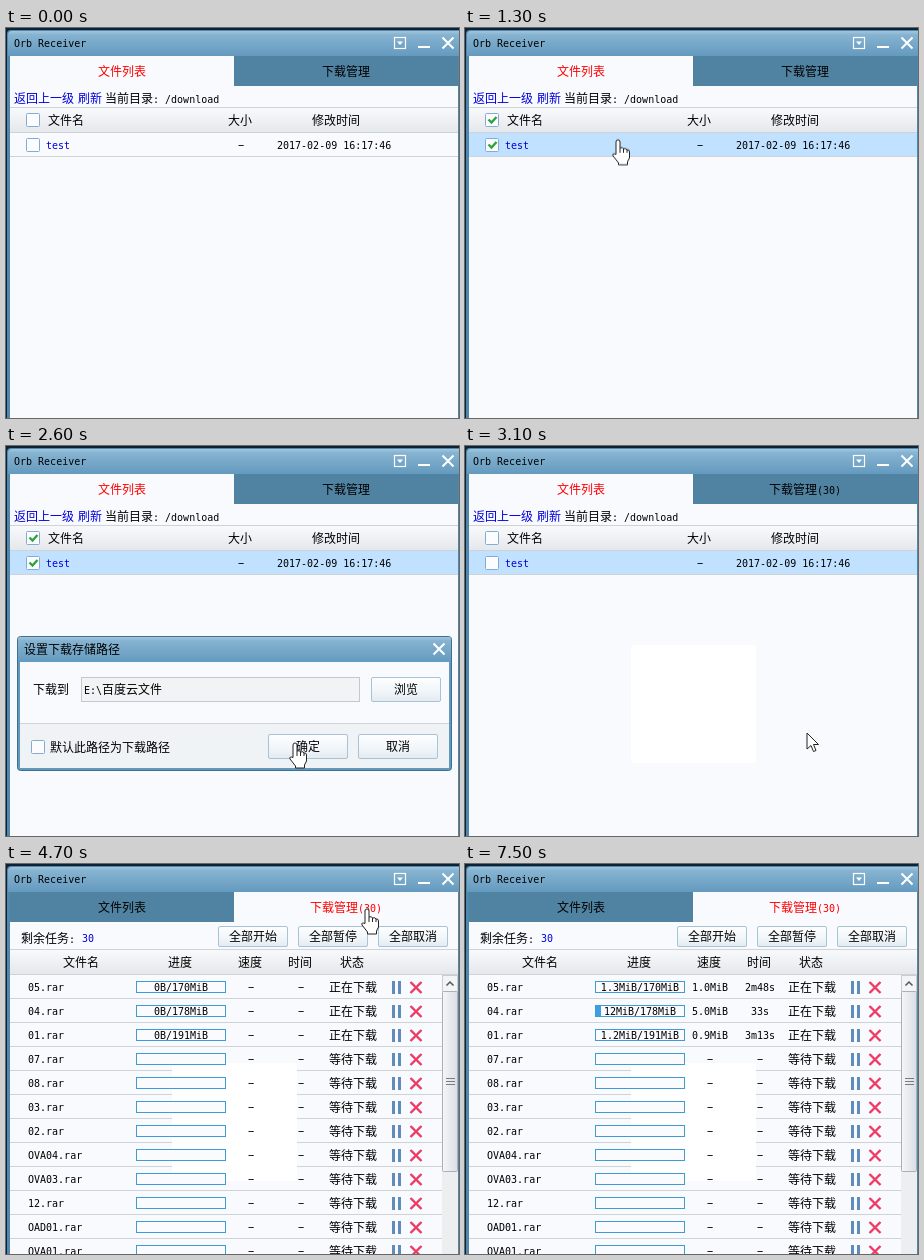
Recreate the animation shown at these times as an HTML page. Size 453 by 390 pixels, loop 8000 ms.

```html
<!DOCTYPE html>
<html lang="zh">
<head>
<meta charset="utf-8">
<title>Orb Receiver</title>
<style>
html, body { margin: 0; width: 100%; height: 100%; overflow: hidden; background: #0d2233; }
svg { display: block; }
text { font: 12px "Noto Sans Mono CJK SC", "Noto Sans CJK SC", monospace; fill: #000; white-space: pre; }
.lat { font: 10px "DejaVu Sans Mono", monospace; }
.dash { font: 12px "Liberation Mono", monospace; }
.mid { text-anchor: middle; }
.blue { fill: #00d; }
.red { fill: #f00; }
.page { fill: #f8fafd; }
.tab { fill: #5082a2; }
.line { stroke: #cfd3d8; }
.icon { fill: none; stroke: #fff; stroke-width: 2; }
.box { fill: #fafcff; stroke: #86abd0; }
.tick { fill: none; stroke: #2fa33b; stroke-width: 2.4; }
.btn { fill: url(#face); stroke: #a9c3d6; }
.bar { fill: #f9fbfe; stroke: #419bd3; }
.fill { fill: #3f9ee0; }
.pause { fill: #5f8cb8; }
.cancel { fill: none; stroke: #ee3a64; stroke-width: 2.4; }
.ptr { fill: #fff; stroke: #222; stroke-linejoin: round; }

.hover, .sel, .ticks, .dialog, .ghost, .early, .late, .queue, .cursor, .arrow, .hand {
  animation: 8s step-end infinite;
}
.hover { animation-name: hover; }
.sel { animation-name: sel; }
.ticks { animation-name: ticks; }
.dialog { animation-name: dialog; }
.ghost { animation-name: ghost; }
.early { animation-name: early; }
.late { animation-name: late; }
.queue { animation-name: queue; }
.cursor { animation-name: move; }
.arrow { animation-name: arrow; }
.hand { animation-name: hand; }

@keyframes hover { 0%, 16.25% { opacity: 0 } 8.75% { opacity: 1 } }
@keyframes sel { 0% { opacity: 0 } 16.25%, 100% { opacity: 1 } }
@keyframes ticks { 0%, 35%, 100% { opacity: 0 } 16.25% { opacity: 1 } }
@keyframes dialog { 0%, 33.75%, 100% { opacity: 0 } 21.25% { opacity: 1 } }
@keyframes ghost { 0% { opacity: 0 } 35%, 100% { opacity: 1 } }
@keyframes early { 0% { opacity: 1 } 37.5%, 100% { opacity: 0 } }
@keyframes late { 0% { opacity: 0 } 37.5%, 100% { opacity: 1 } }
@keyframes queue { 0% { opacity: 0 } 58.75%, 100% { opacity: 1 } }
@keyframes hand {
  0%, 21.25%, 33.75%, 71.25%, 100% { opacity: 0 }
  8.75%, 30%, 55% { opacity: 1 }
}
@keyframes arrow {
  0%, 21.25%, 33.75%, 71.25%, 100% { opacity: 1 }
  8.75%, 30%, 55% { opacity: 0 }
}
@keyframes move {
  0% { transform: translate(505px, 212px); animation-timing-function: steps(5) }
  6.25% { transform: translate(215px, 92px) }
  7.5% { transform: translate(180px, 84px) }
  8.75% { transform: translate(156px, 106px) }
  10% { transform: translate(145px, 112px) }
  12.5% { transform: translate(145px, 112px); animation-timing-function: steps(5) }
  18.75% { transform: translate(160px, 115px) }
  21.25% { transform: translate(160px, 119px); animation-timing-function: steps(3) }
  25% { transform: translate(214px, 191px); animation-timing-function: steps(4) }
  30% { transform: translate(290px, 299px) }
  33.75% { transform: translate(290px, 299px); animation-timing-function: steps(7) }
  42.5% { transform: translate(381px, 278px) }
  50% { transform: translate(374px, 160px); animation-timing-function: steps(3) }
  53.75% { transform: translate(359px, 64px) }
  55% { transform: translate(357px, 52px) }
  56.25% { transform: translate(362px, 47px) }
  70% { transform: translate(392px, 36px) }
  71.25% { transform: translate(415px, 23px) }
  72.5%, 100% { transform: translate(430px, -40px) }
}
</style>
</head>
<body>
<svg width="453" height="390" viewBox="0 0 453 390">
  <defs>
    <linearGradient id="title" x2="0" y2="1">
      <stop stop-color="#a3c6dd"/><stop offset=".15" stop-color="#86b3d1"/><stop offset="1" stop-color="#649abf"/>
    </linearGradient>
    <linearGradient id="head" x2="0" y2="1">
      <stop stop-color="#f9fafc"/><stop offset="1" stop-color="#e4e7eb"/>
    </linearGradient>
    <linearGradient id="face" x2="0" y2="1">
      <stop stop-color="#fdfeff"/><stop offset=".5" stop-color="#f3f7fa"/><stop offset="1" stop-color="#e3ebf1"/>
    </linearGradient>
    <linearGradient id="thumb">
      <stop stop-color="#f5f6f8"/><stop offset="1" stop-color="#dadee3"/>
    </linearGradient>
    <path id="cross" d="M-5.5-5.5 5.5 5.5M5.5-5.5-5.5 5.5"/>
    <path id="tick" d="M3.5 6.5 6.5 9.5 11.5 4"/>
    <rect id="check" x=".5" y=".5" width="13" height="13" rx="1"/>
    <rect id="ghost" x="166" y="199" width="125" height="118" rx="3" fill="#fff"/>
  </defs>

  <!-- window frame -->
  <path d="M1 390V6q0-4 4-4H453V390z" fill="#4f87ad"/>
  <path d="M2 28V7q0-4 4-4H453V28z" fill="url(#title)"/>
  <text class="lat" x="8" y="19">Orb Receiver</text>
  <g class="icon">
    <rect x="388.5" y="9.5" width="11" height="11" stroke-width="1.2"/>
    <path d="M391 13.5h6l-3 3.5z" fill="#fff" stroke="none"/>
    <path d="M412 19h12"/>
    <use href="#cross" x="442" y="15"/>
  </g>

  <!-- file list -->
  <rect class="page" x="4" y="28" width="448" height="362"/>
  <rect class="tab" x="228" y="28" width="224" height="30"/>
  <text class="mid red" x="116" y="48">文件列表</text>
  <text class="mid early" x="340" y="48">下载管理</text>
  <text class="mid late" x="340" y="48">下载管理<tspan class="lat">(30)</tspan></text>
  <text class="blue" x="8" y="75">返回上一级</text>
  <text class="blue" x="72" y="75">刷新</text>
  <text x="99" y="75">当前目录<tspan class="lat">: /download</tspan></text>
  <rect x="4" y="79" width="448" height="26" fill="url(#head)"/>
  <rect class="hover" x="4" y="105" width="448" height="24" fill="#e7f4ff"/>
  <rect class="sel" x="4" y="105" width="448" height="24" fill="#c0e1ff"/>
  <path class="line" d="M4 79.5H452M4 104.5H452M4 128.5H452"/>
  <g class="box"><use href="#check" x="20" y="85"/><use href="#check" x="20" y="110"/></g>
  <g class="ticks"><g class="tick"><use href="#tick" x="20" y="85"/><use href="#tick" x="20" y="110"/></g></g>
  <text x="42" y="97">文件名</text>
  <text x="222" y="97">大小</text>
  <text x="306" y="97">修改时间</text>
  <text class="lat blue" x="40" y="121">test</text>
  <text class="dash mid" x="235" y="121">–</text>
  <text class="lat" x="271" y="121">2017-02-09 16:17:46</text>
  <use class="ghost" href="#ghost"/>

  <!-- save path dialog -->
  <g class="dialog">
    <rect x="11.5" y="190.5" width="434" height="134" rx="3" fill="#6198bd" stroke="#41708f"/>
    <rect x="12" y="191" width="433" height="25" rx="2" fill="url(#title)"/>
    <rect class="page" x="14" y="216" width="429" height="106"/>
    <rect x="14" y="277" width="429" height="45" fill="#eff3f5"/>
    <path class="line" d="M14 277.5H443"/>
    <text x="18" y="208">设置下载存储路径</text>
    <use class="icon" href="#cross" x="433" y="203"/>
    <text x="27" y="248">下载到</text>
    <rect x="75.5" y="231.5" width="278" height="24" fill="#f1f3f5" stroke="#c3c8cd"/>
    <text x="78" y="248"><tspan class="lat">E:\</tspan>百度云文件</text>
    <use class="box" href="#check" x="25" y="294"/>
    <text x="44" y="306">默认此路径为下载路径</text>
    <g id="dialogButtons"></g>
  </g>

  <!-- download queue -->
  <g class="queue">
    <rect class="page" x="4" y="28" width="448" height="362"/>
    <rect class="tab" x="4" y="28" width="224" height="30"/>
    <text class="mid" x="116" y="48">文件列表</text>
    <text class="mid red" x="340" y="48">下载管理<tspan class="lat">(30)</tspan></text>
    <text x="15" y="79">剩余任务<tspan class="lat">:</tspan></text>
    <text class="lat blue" x="76" y="78">30</text>
    <g id="queueButtons"></g>
    <rect x="4" y="85" width="448" height="26" fill="url(#head)"/>
    <path class="line" d="M4 85.5H452M4 110.5H452"/>
    <text x="57" y="103">文件名</text>
    <text x="162" y="103">进度</text>
    <text x="232" y="103">速度</text>
    <text x="282" y="103">时间</text>
    <text x="334" y="103">状态</text>
    <g id="lines" class="line"></g>
    <use href="#ghost"/>
    <g id="rows"></g>
    <rect x="436" y="111" width="16" height="279" fill="#eceef0"/>
    <rect x="436.5" y="111.5" width="15" height="16" fill="#f3f4f6" stroke="#c9cdd2"/>
    <path d="M440.5 121.5 444 118l3.5 3.5" fill="none" stroke="#555" stroke-width="1.5"/>
    <rect x="436.5" y="127.5" width="15" height="180" rx="1" fill="url(#thumb)" stroke="#aab0b7"/>
    <path d="M440 214.5h9M440 217.5h9M440 220.5h9" stroke="#777d85"/>
  </g>

  <g class="cursor">
    <path class="ptr arrow" d="M0 0V16L4 12.5 6.5 18.5 9 17.5 6.5 11.5H11.5z"/>
    <g class="ptr hand">
      <path d="M-3 12V0a2 2 0 0 1 4 0v6q3-1 3.5 1 3-1 3.5 1 2.5-.5 2.5 2v6l-2 4v3h-9v-2l-5.500-7q-1-3 3-1.500z"/>
      <path d="M1 6v5M4.5 7v4M8 8v3" fill="none"/>
    </g>
  </g>
</svg>
<script>
const LOOP = 8000;
const $ = id => document.getElementById(id);

const button = (x, y, w, h, label) =>
  `<rect class="btn" x="${x + .5}" y="${y + .5}" width="${w - 1}" height="${h - 1}" rx="1.5"/>
   <text class="mid" x="${x + w / 2}" y="${y + h / 2 + 4.5}">${label}</text>`;

$('dialogButtons').innerHTML =
  button(365, 231, 70, 25, '浏览') + button(262, 288, 80, 25, '确定') + button(352, 288, 80, 25, '取消');
$('queueButtons').innerHTML =
  ['开始', '暂停', '取消'].map((s, i) => button(212 + 80 * i, 62, 70, 21, '全部' + s)).join('');

// Active downloads: size in MiB and updates as [ms, MiB done, MiB per second, time left]
const active = [
  { size: 170, log: [[6300, '0.3', '0.3', '9m28s'], [7200, '1.3', '1.0', '2m48s']] },
  { size: 178, log: [[5400, '4.2', '4.2', '41s'], [6400, '8.1', '4.6', '36s'], [7300, '12', '5.0', '33s']] },
  { size: 191, log: [[6600, '0.3', '0.3', '9m43s'], [7500, '1.2', '0.9', '3m13s']] },
];
const names = ['05', '04', '01', '07', '08', '03', '02', 'OVA04', 'OVA03', '12', 'OAD01', 'OVA01'];

const row = (name, i) => {
  const y = 123 + 24 * i;
  return `<g>
    <text class="lat" x="22" y="${y + 4}">${name}.rar</text>
    <rect class="bar" x="130.5" y="${y - 5.5}" width="89" height="11"/>
    <rect class="fill" x="131" y="${y - 5}" width="0" height="10"/>
    <text class="lat mid done" x="175" y="${y + 4}"></text>
    <text class="dash mid speed" x="245" y="${y + 4}">–</text>
    <text class="dash mid left" x="295" y="${y + 4}">–</text>
    <text x="323" y="${y + 5}">${i < active.length ? '正在' : '等待'}下载</text>
    <path class="pause" d="M386 ${y - 6}h3v13h-3zM392 ${y - 6}h3v13h-3z"/>
    <use class="cancel" href="#cross" x="410" y="${y + .5}"/>
  </g>`;
};
$('rows').innerHTML = names.map(row).join('');
$('lines').innerHTML = names.map((_, i) => `<path d="M4 ${134.5 + 24 * i}H436"/>`).join('');

active.forEach((job, i) => {
  const part = s => $('rows').children[i].querySelector(s);
  Object.assign(job, { done: part('.done'), speed: part('.speed'), left: part('.left'), fill: part('.fill') });
});

function update(job, t) {
  const now = job.log.filter(e => e[0] <= t).pop();
  if (now === job.shown) return;
  job.shown = now;
  const [, done, speed, left] = now || [0, 0, 0, '–'];
  job.done.textContent = `${now ? done + 'MiB' : '0B'}/${job.size}MiB`;
  job.speed.textContent = now ? speed + 'MiB' : '–';
  job.left.textContent = left;
  for (const el of [job.speed, job.left]) {
    el.classList.toggle('dash', !now);
    el.classList.toggle('lat', !!now);
  }
  job.fill.setAttribute('width', Math.floor(done / job.size * 88));
}

let start;
function tick(now) {
  start ??= now;
  const t = (now - start) % LOOP;
  for (const job of active) update(job, t);
  requestAnimationFrame(tick);
}
for (const job of active) {
  job.shown = null;
  update(job, 0);
}
requestAnimationFrame(tick);
</script>
</body>
</html>
```
